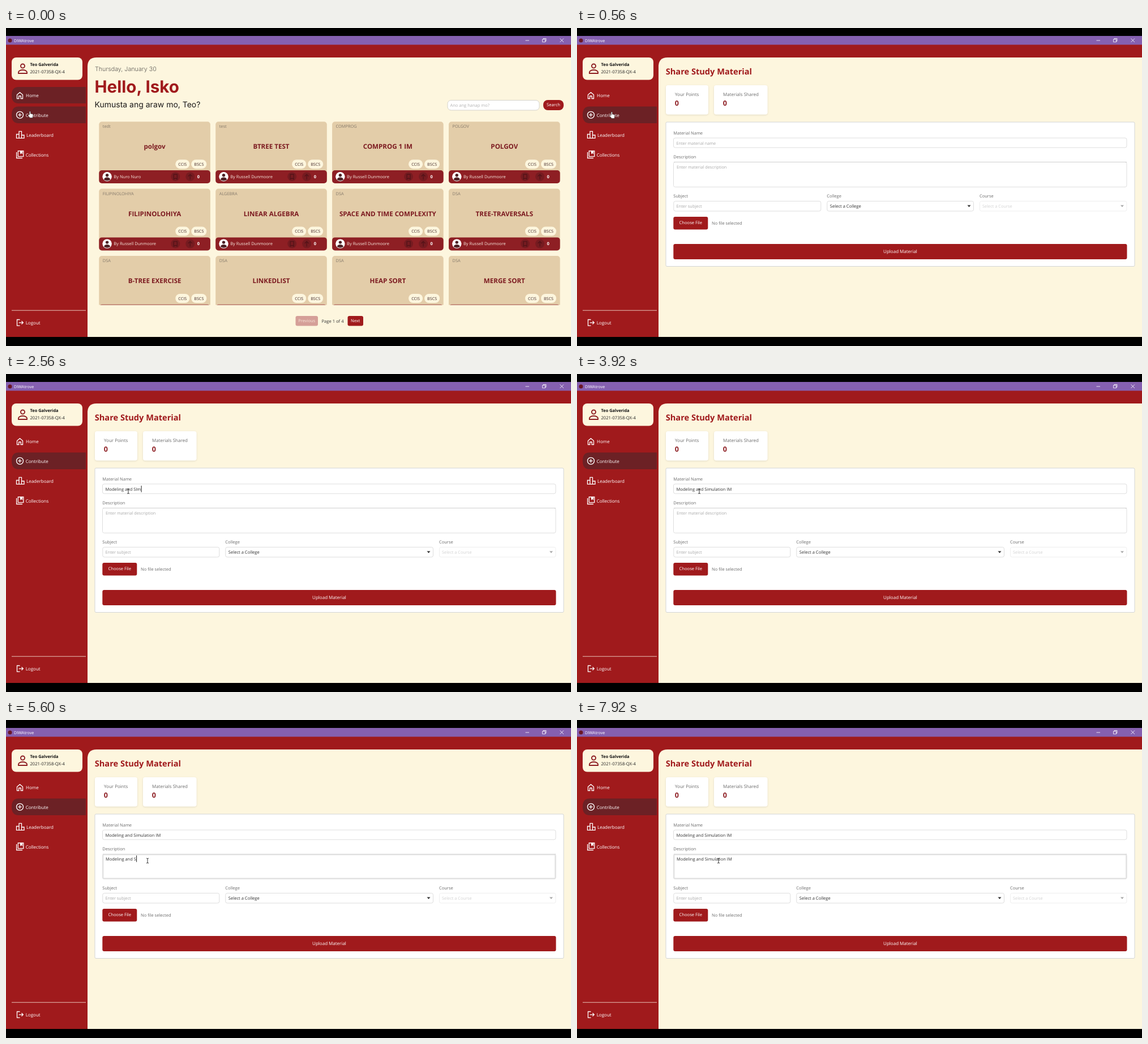
An HTML page for the animation above (8 s loop, 998x561 px).

```html
<!DOCTYPE html>
<html lang="en">
<head>
<meta charset="utf-8">
<title>Study materials</title>
<style>
  html, body { margin: 0; width: 100%; height: 100%; overflow: hidden; background: #000; }
  svg { display: block; width: 100%; height: 100%; }
  text { font-family: "Open Sans", "Noto Sans", sans-serif; white-space: pre; text-rendering: geometricPrecision; }
  .display { font-family: Inter, sans-serif; }
  .icon { fill: none; stroke: #fff; stroke-width: 1.3; }
</style>
</head>
<body>
<svg id="stage" viewBox="0 0 998 561" xmlns="http://www.w3.org/2000/svg"></svg>
<script>
const RED = '#a01a1c', CREAM = '#fdf6de', TAN = '#e3cda9', WINE = '#8e1f24', DARK = '#6c2125', GREY = '#6b6b6b';
const LOOP = 8000, STEP = 80;

const rect = (x, y, w, h, fill, r = 0, extra = '') =>
  `<rect x="${x}" y="${y}" width="${w}" height="${h}" rx="${r}" fill="${fill}" ${extra}/>`;
const label = (x, y, size, fill, str, extra = '') =>
  `<text x="${x}" y="${y}" font-size="${size}" fill="${fill}" ${extra}>${str}</text>`;
const MID = 'text-anchor="middle"', BOLD = 'font-weight="700"';
const icon = (d, extra = '') => `<path class="icon" d="${d}" ${extra}/>`;

function windowFrame() {
  return rect(0, 14, 998, 531, RED) +
    rect(0, 14, 998, 15.5, '#8560b0') +
    '<circle cx="7" cy="22" r="3.5" fill="#6b1726"/>' +
    label(14, 24.7, 7.2, '#fff', 'DIWAtrove') +
    icon('M917.5 22H924M947.5 20H952.500V24.700H947.500ZM949 20V18.500H954V23.200H952.500M978.500 18.500 985 25M985 18.500 978.500 25',
      'style="stroke-width:.8"') +
    `<path d="M144 545V68Q144 52 160 52H998V545Z" fill="${CREAM}"/>`;
}

function sidebar() {
  const items = [['Home', 35, 122], ['Contribute', 34.7, 156.5], ['Leaderboard', 36, 191.5],
    ['Collections', 34.7, 226.5], ['Logout', 34.7, 522.8]];
  const highlight = (y, h, id) =>
    `<path id="${id}" d="M141 ${y}H22Q10 ${y} 10 ${y + h / 2}T22 ${y + h}H141Z" fill="${DARK}"/>`;
  return rect(10, 52, 125, 39.5, CREAM, 8) +
    `<g fill="none" stroke="${WINE}" stroke-width="1.9"><circle cx="29.500" cy="67" r="3.500"/>
     <path d="M22 80V78C22 75.500 26 74 29.500 74S37 75.500 37 78V80Z"/></g>` +
    label(42.5, 67, 7.4, '#111', 'Teo Galverida', BOLD) +
    label(42.5, 80.3, 7.65, '#222', '2021-07358-QX-4') +
    highlight(104, 29, 'homeMark') + highlight(138.500, 29.5, 'contributeMark') +
    items.map(([name, x, y]) => label(x, y, 8, '#fff', name)).join('') +
    icon('M19.500 117.700 24.500 113.700 29.500 117.700V124.500H26.300V120H22.700V124.500H19.500Z') +
    '<circle class="icon" cx="24.500" cy="153.300" r="6"/>' + icon('M21.300 153.300H27.700M24.500 150.100V156.500') +
    icon('M18.500 187.500H23V194.300H18.500ZM23 182.300H27.500V194.300H23ZM27.500 189H32V194.300H27.500Z') +
    icon('M18.600 219V229.500H29M21.300 217H30.800V226.700H21.300Z') +
    '<path d="M25 217h4.200v5.400l-2.100-1.500-2.100 1.500Z" fill="#fff"/>' +
    icon('M24.500 514.500H19.500V525.200H24.500M22.700 519.800H30M27.500 517 30.300 519.800 27.500 522.600') +
    rect(10, 497.7, 131, 1, '#e9c3b8');
}

function card(col, row, subject, title, author) {
  const pill = (x, w, str) => rect(x, 67, w, 16, CREAM, 8) + label(x + w / 2, 77.8, 7.2, '#4a3030', str, MID);
  return `<g transform="translate(${164.3 + col * 205.9} ${165.2 + row * 118.4})">` +
    rect(0, 0, 196.6, 106, TAN, 5) +
    label(6.5, 11.3, 7.4, '#857a6b', subject) +
    label(98.3, 48, 11.6, '#7c1a20', title, MID + BOLD.replace('font', ' font')) +
    pill(135, 25, 'CCIS') + pill(163, 27, 'BSCS') +
    rect(0, 85.8, 196.6, 23, WINE, 5) +
    `<circle cx="14.300" cy="97" r="8.200" fill="#fff"/><circle cx="14.300" cy="94.500" r="2.700" fill="#4e2226"/>
     <path d="M8.800 102.500C9 97 19.600 97 19.800 102.500Q14.300 106 8.800 102.500Z" fill="#4e2226"/>` +
    label(26, 99.8, 7.5, '#f6e6dc', 'By ' + author) +
    `<g fill="#761b20"><circle cx="135" cy="97" r="8"/><circle cx="161" cy="97" r="8"/></g>
     <g fill="none" stroke="#541318" stroke-width="1.400"><path d="M132 93H138V101.500L135 99.700 132 101.500Z"/>
     <path d="M161 102V93M157.500 96.500 161 93 164.500 96.500"/></g>` +
    label(173.5, 99.8, 7.5, '#fff', '0', BOLD) + '</g>';
}

function homePage() {
  const cards = [['tedt', 'polgov'], ['test', 'BTREE TEST'], ['COMPROG', 'COMPROG 1 IM'], ['POLGOV', 'POLGOV'],
    ['FILIPINOLOHIYA', 'FILIPINOLOHIYA'], ['ALGEBRA', 'LINEAR ALGEBRA'], ['DSA', 'SPACE AND TIME COMPLEXITY'],
    ['DSA', 'TREE-TRAVERSALS'], ['DSA', 'B-TREE EXERCISE'], ['DSA', 'LINKEDLIST'], ['DSA', 'HEAP SORT'], ['DSA', 'MERGE SORT']];
  return label(157, 76, 10.7, '#5d5a55', 'Thursday, January 30', 'class="display" font-weight="300"') +
    label(156.5, 113.5, 29.6, RED, 'Hello, Isko', 'class="display" font-weight="700"') +
    label(156.5, 140.3, 14, '#1c1a1a', 'Kumusta ang araw mo, Teo?', 'class="display"') +
    rect(780, 127.5, 162, 17.5, '#fff', 6, 'stroke="#d5d3cc"') +
    label(784.5, 139, 7.5, '#b3b3b3', 'Ano ang hanap mo?') +
    rect(949, 127, 36, 18, RED, 8) + label(967, 138.4, 7.6, '#fff', 'Search', MID) +
    '<clipPath id="list"><rect x="150" y="160" width="840" height="328.500"/></clipPath><g clip-path="url(#list)">' +
    cards.map(([subject, title], i) =>
      card(i % 4, Math.floor(i / 4), subject, title, i ? 'Russell Dunmoore' : 'Nuro Nuro')).join('') + '</g>' +
    rect(511.5, 508, 39.5, 17.5, '#d59f98', 3) + label(531.2, 519.3, 7.5, '#f6e3d8', 'Previous', MID) +
    label(557.5, 519.5, 7.6, '#333', 'Page 1 of 4') +
    rect(603.5, 508, 27.5, 17.5, RED, 3) + label(617.2, 519.3, 7.5, '#fff', 'Next', MID);
}

const field = (x, y, w, h, extra = '') => rect(x + .5, y + .5, w - 1, h - 1, '#fff', 3, `stroke="#dedede" ${extra}`);

function formRow(id, collegeX, courseX) {
  const arrow = (x, fill) => `<path d="M${x - 3} 312.500h6l-3 3.500Z" fill="${fill}"/>`;
  const column = (x, end, name) => label(x, 299.3, 7.5, GREY, name) + field(x, 305, end - x, 18.5, name === 'Course' ? 'opacity=".5"' : '');
  return `<g id="${id}">` +
    column(170.3, collegeX - 10, 'Subject') + column(collegeX, courseX - 10, 'College') + column(courseX, 971.5, 'Course') +
    label(175.5, 317.3, 7.4, '#a9a9a9', 'Enter subject') +
    label(collegeX + 5.5, 317.3, 7.6, '#333', 'Select a College') + arrow(courseX - 18.500, '#333') +
    label(courseX + 5, 317.3, 7.4, '#d2d2d2', 'Select a Course') + arrow(963, '#a8a8a8') + '</g>';
}

function formPage() {
  const stat = (x, w, name) => rect(x, 101, w, 51.5, '#fff', 4, 'filter="url(#soft)"') +
    label(x + 16, 120, 8, GREY, name) + label(x + 15.7, 137.3, 12.5, WINE, '0', BOLD);
  return '<filter id="soft"><feDropShadow dx="0" dy="1" stdDeviation="1.500" flood-opacity=".12"/></filter>' +
    label(156.7, 81.7, 14.6, RED, 'Share Study Material', BOLD) +
    stat(157, 75, 'Your Points') + stat(242, 94.5, 'Materials Shared') +
    rect(157, 166, 828, 254.500, '#fff', 2, 'stroke="#d3d5d6"') +
    label(170.3, 187.5, 7.5, GREY, 'Material Name') + field(170, 193.5, 801.5, 18) +
    label(170.3, 229.5, 7.5, GREY, 'Description') + field(170, 236, 801.500, 45) +
    rect(171, 236, 800, 1, '#cfcfcf') +
    `<g id="descFocus">${rect(171.300, 237.300, 799, 42.400, 'none', 2, 'stroke="#e2e2e2" stroke-width="2.200"')}</g>` +
    label(175.5, 205.5, 7.3, '#a9a9a9', 'Enter material name', 'id="nameHint"') +
    label(176, 247.5, 7.3, '#a9a9a9', 'Enter material description', 'id="descHint"') +
    label(175.5, 205.5, 7.47, '#333', '', 'id="nameText"') +
    label(176, 247.5, 7.47, '#333', '', 'id="descText"') +
    rect(0, 197, 1, 11.5, '#222', 0, 'id="nameCaret"') + rect(0, 239, 1, 11.5, '#222', 0, 'id="descCaret"') +
    formRow('evenRow', 441.3, 711) + formRow('settledRow', 387.3, 765) +
    rect(170.3, 333, 61, 22.5, RED, 3) + label(200.8, 346.3, 7.6, '#fff', 'Choose File', MID) +
    label(238, 346.5, 7.5, GREY, 'No file selected') +
    rect(170.3, 381, 801.2, 27, RED, 3) + label(571, 397.3, 8, '#fff', 'Upload Material', MID);
}

// Pointer shapes have their hot spot near the origin.
const pointers = `<g id="pointer">
  <path id="hand" d="M-1.700 0V-5Q-1.700-6-.700-6T.300-5V-2L3.800-1.200Q5-.800 4.800 .500L4 5.500H-.800L-4 1.300Q-4.300 0-3 0Z" fill="#fff" stroke="#333" stroke-width=".6"/>
  <path id="arrow" d="M0 0V10L2.400 7.800 4 11.300 5.500 10.600 4 7.200H7Z" fill="#fff" stroke="#222" stroke-width=".7"/>
  <path id="beam" d="M-2-4Q0-4 0-3Q0-4 2-4M0-3.500V4M-2 4.500Q0 4.500 0 3.500Q0 4.500 2 4.500" fill="none" stroke="#222" stroke-width=".9"/></g>`;

document.getElementById('stage').innerHTML = windowFrame() + sidebar() +
  `<g id="home">${homePage()}</g><g id="form">${formPage()}</g>` + pointers;

const el = id => document.getElementById(id);
const show = (id, on) => el(id).setAttribute('display', on ? 'inline' : 'none');

// Each burst of typing: start, end, characters kept, characters added.
const nameBursts = [[1360, 2160, 0, 'Modeling and S'], [2320, 2480, 14, 'Im'], [2640, 2640, 14, 'I'],
  [2800, 3280, 14, 'imulatio'], [3440, 3680, 22, 'n IM']];
const descBursts = [[4720, 5520, 0, 'Modeling and '], [5600, 6240, 13, 'Simulation'], [6480, 6640, 23, ' IM']];

function typed(bursts, t) {
  return bursts.reduce((text, [start, end, keep, added]) => {
    if (t < start) return text;
    const progress = end > start ? Math.min(1, (t - start) / (end - start)) : 1;
    return text.slice(0, keep) + added.slice(0, 1 + Math.floor(progress * (added.length - 1) + 1e-6));
  }, '');
}

function updateField(name, bursts, t, focusAt, caretOn) {
  const text = el(name + 'Text');
  text.textContent = typed(bursts, t);
  show(name + 'Hint', t < focusAt);
  show(name + 'Caret', caretOn);
  el(name + 'Caret').setAttribute('x', +text.getAttribute('x') + text.getComputedTextLength() + .3);
}

const path = [[0, 43, 153], [400, 62, 154], [560, 62, 154], [1120, 216, 206.500],
  [3920, 216, 206.500], [4160, 250, 248], [LOOP, 250, 248]];

function pointerAt(t) {
  const i = path.findIndex(point => t < point[0]);
  const [t0, x0, y0] = path[i - 1], [t1, x1, y1] = path[i];
  const p = (t - t0) / (t1 - t0), ease = p * p * (3 - 2 * p);
  return [x0 + (x1 - x0) * ease, y0 + (y1 - y0) * ease];
}

const within = (t, ...spans) => spans.some(([a, b]) => t >= a && t < b);

function draw(now) {
  const t = Math.floor(now % LOOP / STEP) * STEP;
  const onHome = t < 560;
  show('home', onHome);
  show('homeMark', onHome);
  show('form', !onHome);
  show('evenRow', t < 640);
  show('settledRow', t >= 640);
  show('descFocus', t >= 4160);

  updateField('name', nameBursts, t, 1120, within(t, [1120, 3920]));
  updateField('desc', descBursts, t, 4160, within(t, [4160, 4480], [4720, 6880], [7120, 7440], [7680, 7920]));

  const [x, y] = pointerAt(t);
  const overSidebar = x < 141;
  const overField = !overSidebar && within(y, [194, 212], [236, 281]);
  el('pointer').setAttribute('transform', `translate(${x} ${y})`);
  show('hand', overSidebar);
  show('beam', overField);
  show('arrow', !overSidebar && !overField);
}

const began = performance.now();
function tick() {
  draw(performance.now() - began);
  requestAnimationFrame(tick);
}
tick();
</script>
</body>
</html>
```
